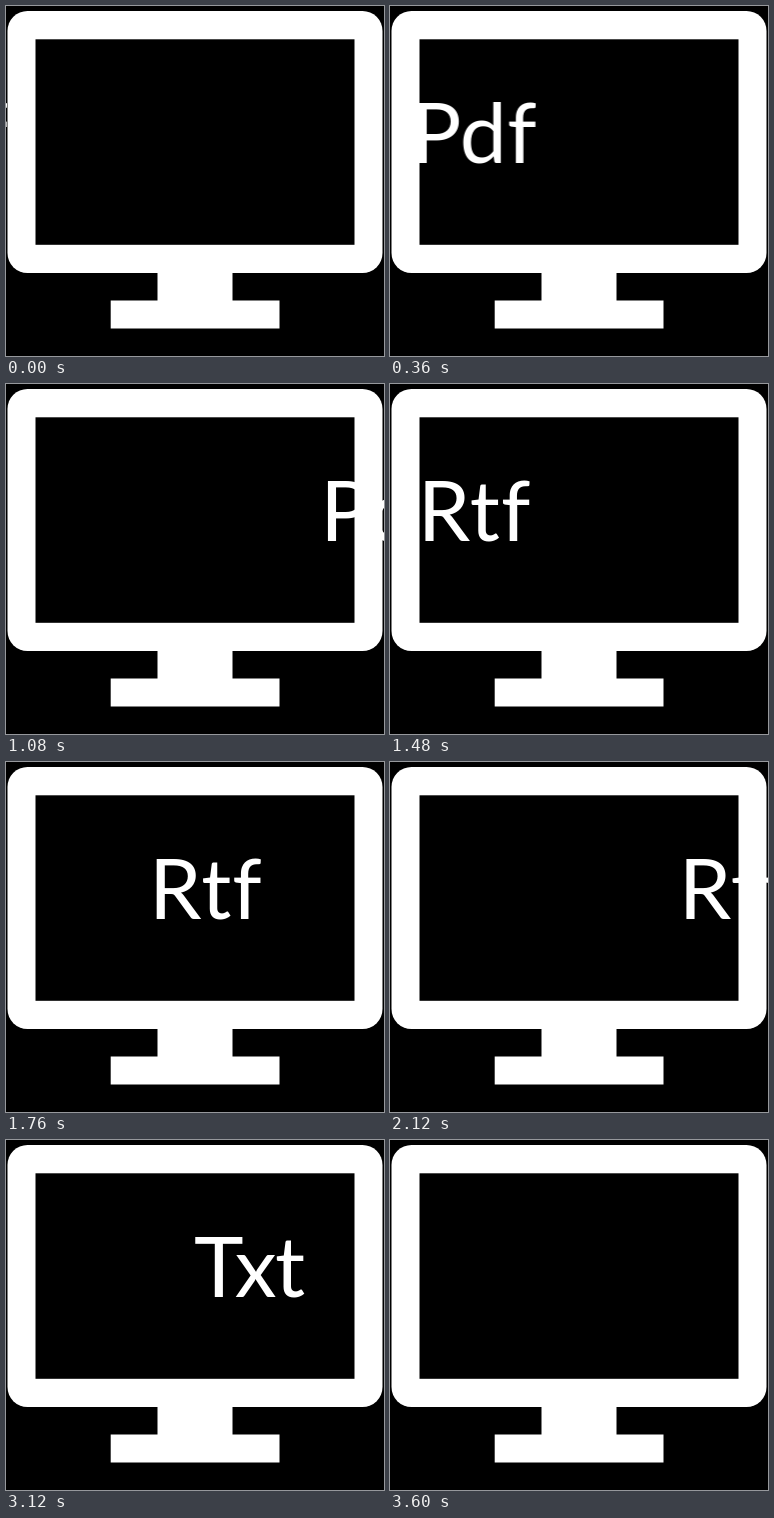
Write an HTML page without scripts that moves like this. It is 378 by 350 pixels and loops after 3.64 s.

```html
<!DOCTYPE html>
<html lang="en">
<head>
<meta charset="utf-8">
<title>File formats crossing a monitor</title>
<style>
  html, body {
    margin: 0;
    width: 100%;
    height: 100%;
    overflow: hidden;
    background: #000;
  }
  svg { display: block; }

  text {
    font: 84px Lato, sans-serif;
    fill: #fff;
    animation: cross 3640ms infinite;
  }
  /* Delays run 5 ms early so each 40 ms step is settled on time. */
  .pdf { animation-delay: -5ms; letter-spacing: .5px; }
  .rtf { animation-delay: -2525ms; letter-spacing: 1px; }
  .txt { animation-name: cross-last; animation-delay: -1245ms; letter-spacing: -1.5px; }

  @keyframes cross {
    0%       { transform: translateX(-57px); animation-timing-function: steps(14); }
    15.3846% { transform: translateX(168px); animation-timing-function: steps(2); }
    17.5824% { transform: translateX(203px); animation-timing-function: steps(11); }
    29.6703% { transform: translateX(381px); animation-timing-function: steps(4); }
    34.0659%, 100% { transform: translateX(446px); }
  }
  @keyframes cross-last {
    0%       { transform: translateX(-54px); animation-timing-function: steps(6); }
    6.5934%  { transform: translateX(45px); animation-timing-function: steps(4); }
    10.989%  { transform: translateX(112px); animation-timing-function: steps(8); }
    19.7802% { transform: translateX(244px); animation-timing-function: steps(6); }
    26.3736% { transform: translateX(339px); animation-timing-function: steps(6); }
    32.967%, 100% { transform: translateX(436px); }
  }
</style>
</head>
<body>
<svg width="378" height="350" viewBox="0 0 378 350">
  <rect width="378" height="350"/>
  <g fill="#fff">
    <rect x="1.5" y="5" width="375" height="262" rx="20"/>
    <path d="M151.5 266H226.500V294.500H273.500V322.500H104.700V294.500H151.500Z"/>
  </g>
  <rect x="29.500" y="33.300" width="319" height="205.500"/>
  <text class="pdf" x="-66.800" y="157">Pdf</text>
  <text class="rtf" x="-60" y="157">Rtf</text>
  <text class="txt" x="-56" y="157">Txt</text>
</svg>
</body>
</html>
```
